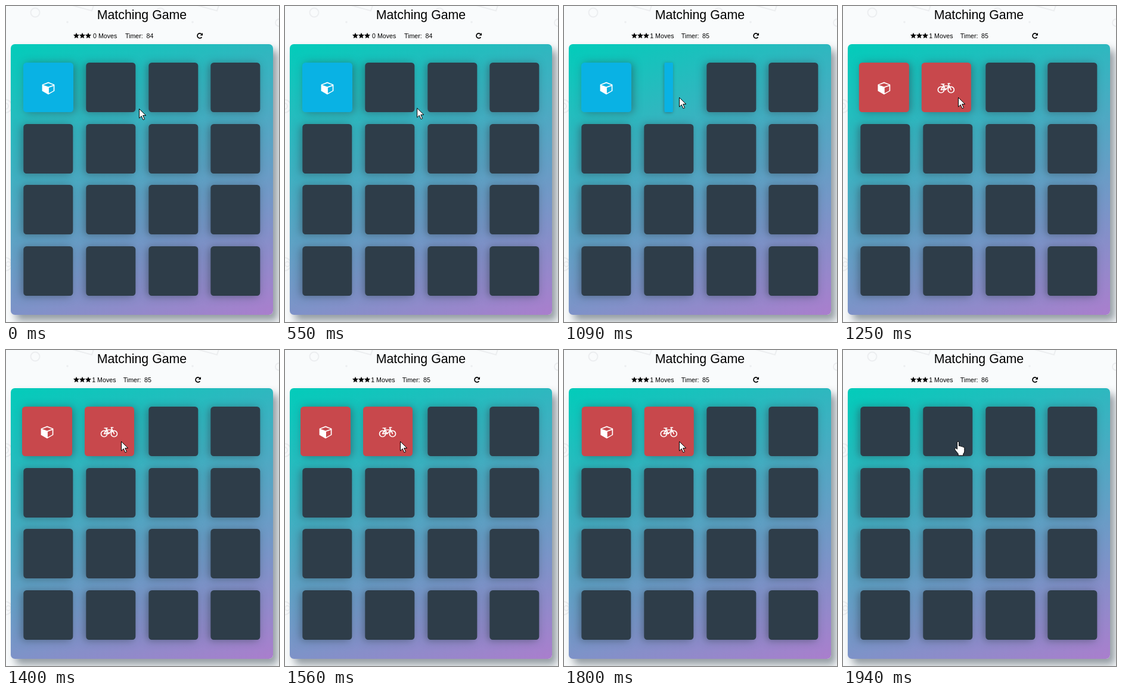
An HTML page for the animation above (2.8 s loop, 458x530 px).

```html
<!DOCTYPE html>
<html lang="en">
<head>
<meta charset="utf-8">
<title>Matching Game</title>
<style>
  html, body { margin: 0; width: 100%; height: 100%; overflow: hidden; background: #f9fbfc; }
  body { position: relative; }
  svg { position: absolute; left: 0; top: 0; overflow: visible; }
  text { font-family: "Liberation Sans", Arial, sans-serif; font-size: 10.67px; fill: #000; }
  text.title { font-size: 21.33px; }
  #deck {
    position: absolute; left: 8px; top: 64px; width: 440px; height: 453.6px;
    border-radius: 6.7px;
    background: linear-gradient(160deg, #02ccba 0%, #aa7ecd 100%);
    box-shadow: 8px 10px 13.3px rgba(46, 61, 73, .5);
  }
  .card {
    position: absolute; width: 83.33px; height: 83.33px;
    border-radius: 5.3px; background: #2e3d49;
    box-shadow: 3.3px 1.3px 13.3px rgba(46, 61, 73, .5);
    transform: scaleX(-1);
  }
  .card svg { left: 41.2px; top: 42.8px; width: 1px; height: 1px; visibility: hidden; }
</style>
</head>
<body>
<svg width="458" height="530" fill="none" stroke="#eceef0" stroke-width="2">
  <g id="pattern">
    <circle cx="49" cy="11" r="7.5"/>
    <path d="M111 -1l33 9l3 -9"/>
    <circle cx="103" cy="27" r="1" stroke-width="1.5"/>
  </g>
  <use href="#pattern" x="210"/>
  <circle cx="-1" cy="168" r="11"/><circle cx="-1" cy="168" r="5"/>
  <circle cx="-1" cy="433" r="11"/><circle cx="4" cy="433" r="4"/>
  <circle cx="458" cy="28" r="6"/>
</svg>

<div id="deck"></div>

<svg width="458" height="530">
  <text class="title" x="152.7" y="22">Matching Game</text>
  <g id="stars"></g>
  <text id="moves" y="53.6"></text>
  <text id="label" y="53.6">Timer:</text>
  <text id="timer" y="53.6"></text>
  <g id="reload">
    <path d="M328.1 47.3A4 4 0 1 0 328.4 52.2" fill="none" stroke="#000" stroke-width="1.7"/>
    <path d="M330 45v4.4h-4.4z"/>
  </g>
  <g id="cursor" fill="#fff" stroke="#000" stroke-linejoin="round">
    <path id="arrow" d="M.5 .5v15.6l3.7-3.5 2.8 6.3 2.5-1.1-2.8-6.2h5.1z"/>
    <path id="hand" d="M-1.4 2q0-1.6 1.5-1.6t1.5 1.6v6q3-1 3.2.8q2.8-.8 3 .9q3-.5 3 1.9v5q0 3-2 4.4v3h-8.6v-3l-4.8-5.8q-1.7-2.9-.4-3.5t3.6 1.6z"/>
  </g>
</svg>

<script>
const LOOP = 2800;
const STEPS = [0, 550, 620, 700, 770, 850, 1020, 1090, 1170, 1250, 1340, 1410,
  1480, 1560, 1630, 1715, 1800, 1860, 1940];
const DARK = "#2e3d49", BLUE = "#09b2e4", RED = "#c8484c";
const CUBE = `<path fill="#fff" fill-rule="evenodd" d="M0-10.4L10.4-6.3V4.6L0 10.4L-10.4 4.6V-6.3z
  M0-8.6L8.4-5.5L0-2.4L-8.4-5.5z M.9 8.2L8.7 4V-3.8L.9-1z"/>`;
const BIKE = `<g fill="none" stroke="#fff" stroke-width="1.7" stroke-linecap="round" stroke-linejoin="round">
  <circle cx="-8.4" cy="2.4" r="5.1"/><circle cx="8.4" cy="2.4" r="5.1"/>
  <path d="M-8.4 2.4H-.6L5.2-4H-4.6zM-.6 2.4L-5.4-6.8M-7.8-7H-3M6.6-8H3.4L8.4 2.4"/></g>`;

const $ = id => document.getElementById(id);
const clamp = v => Math.min(1, Math.max(0, v));
const progress = (t, start, length) => clamp((t - start) / length);

const cards = Array.from({ length: 16 }, (_, i) => {
  const card = document.createElement("div");
  card.className = "card";
  card.style.left = 21.33 + (i % 4) * 104.67 + "px";
  card.style.top = 31 + Math.floor(i / 4) * 102.67 + "px";
  return $("deck").appendChild(card);
});
const pair = cards.slice(0, 2);
[CUBE, BIKE].forEach((icon, i) => pair[i].innerHTML = `<svg>${icon}</svg>`);

function star(cx) {
  const points = Array.from({ length: 10 }, (_, i) => {
    const r = i % 2 ? 2.4 : 5.3, a = i * Math.PI / 5;
    return [cx + r * Math.sin(a), 50 - r * Math.cos(a)].map(v => v.toFixed(2));
  });
  return `<polygon points="${points.join(" ")}"/>`;
}
$("stars").innerHTML = [118, 128, 138].map(star).join("");

// turn: 0 is face down, 1 is face up
function pose(card, turn, color, shift) {
  const width = -Math.cos(turn * Math.PI);
  card.style.transform = `translateX(${shift}px) scaleX(${width})`;
  card.style.background = color;
  card.firstChild.style.visibility = width > 0 && color !== DARK ? "visible" : "hidden";
}

function draw(t) {
  const clicked = t >= 1020, wrong = t >= 1220, closing = t > 1800;
  const open = progress(t, 1010, 180), close = progress(t, 1800, 140);
  const shake = wrong && !closing ? -3.6 * Math.sin((t - 1220) / 295 * 2 * Math.PI) : 0;
  const face = closing ? DARK : wrong ? RED : BLUE;
  pose(pair[0], 1 - close, face, shake);
  pose(pair[1], open - close, clicked ? face : DARK, shake);

  const p = progress(t, 530, 320);
  const x = 223 - 30 * p, y = 172 - 19 * p;
  const pointing = x < 217 && (!clicked || closing);
  $("cursor").setAttribute("transform", `translate(${x} ${y})`);
  $("hand").style.display = pointing ? "" : "none";
  $("arrow").style.display = pointing ? "none" : "";

  $("moves").textContent = (clicked ? 1 : 0) + " Moves";
  $("timer").textContent = closing ? 86 : t >= 700 ? 85 : 84;
  $("moves").setAttribute("x", clicked ? 144.2 : 146);
  $("label").setAttribute("x", clicked ? 196.7 : 200);
  $("timer").setAttribute("x", clicked ? 232 : 235.5);
  $("reload").setAttribute("transform", `translate(${clicked ? -3 : 0} 0)`);
}

const began = performance.now();
function tick() {
  const t = (performance.now() - began) % LOOP;
  draw(STEPS.filter(s => s <= t).pop() ?? 0);
  requestAnimationFrame(tick);
}
tick();
</script>
</body>
</html>
```
